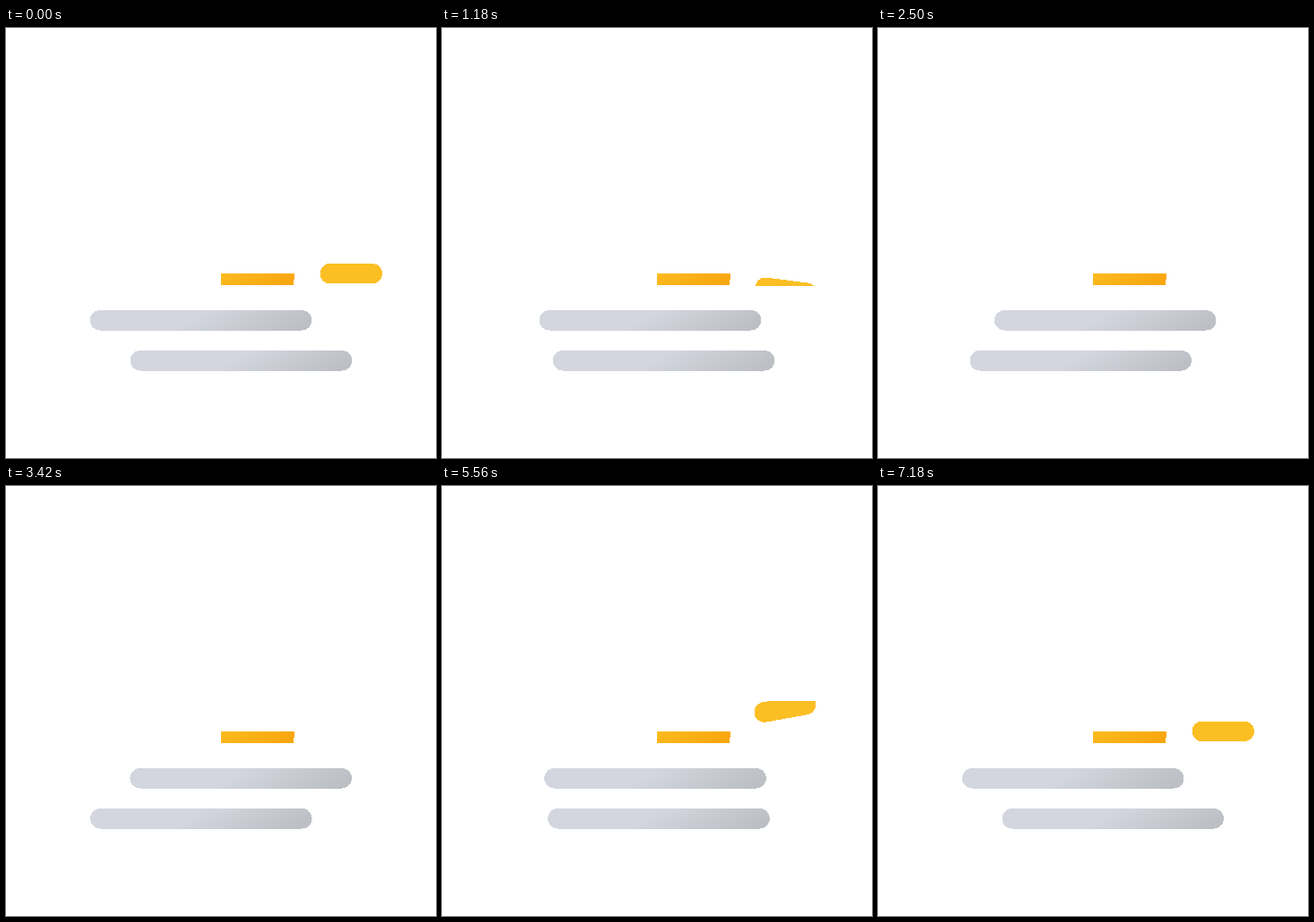
An HTML page that plays this animation: 480x480 px, repeating every 7.22 s.

```html
<!DOCTYPE html>
<html lang="en">
<head>
<meta charset="utf-8">
<title>Sun and fog</title>
<style>
  html, body { margin: 0; width: 100%; height: 100%; overflow: hidden; background: #fff; }
  svg { display: block; width: 100vw; height: 100vh; }
</style>
</head>
<body>
<svg viewBox="0 0 480 480" shape-rendering="crispEdges">
  <defs>
    <linearGradient id="fog" gradientUnits="userSpaceOnUse" x1="-31" y1="-54" x2="31" y2="54">
      <stop offset=".45" stop-color="#d3d6de"/>
      <stop offset="1" stop-color="#bcbfc4"/>
    </linearGradient>
    <linearGradient id="sun" gradientUnits="userSpaceOnUse" x1="240" y1="274" x2="262" y2="312">
      <stop offset="0" stop-color="#fcbb1e"/>
      <stop offset="1" stop-color="#f9a711"/>
    </linearGradient>
    <clipPath id="sky"><rect x="240" y="240" width="240" height="48"/></clipPath>
  </defs>
  <path d="M240 274H321.8A81.8 81.8 0 0 1 320.8 287H240Z" fill="url(#sun)"/>
  <g clip-path="url(#sky)">
    <rect id="ray" x="350.6" y="262.9" width="69.4" height="22.5" rx="11.25" fill="#fbbf24"/>
  </g>
  <rect id="upper" x="-123.75" y="-11.25" width="247.5" height="22.5" rx="11.25" fill="url(#fog)"/>
  <rect id="lower" x="-123.75" y="-11.25" width="247.5" height="22.5" rx="11.25" fill="url(#fog)"/>
</svg>
<script>
  const LOOP = 7220, STEP = 20, CYCLE = 7200, LAST = 7180;
  const LEFT = 217.5, TRAVEL = 45;
  const [ray, upper, lower] = ['ray', 'upper', 'lower'].map(id => document.getElementById(id));

  const bezier = (a, b, s) => 3 * (1 - s) ** 2 * s * a + 3 * (1 - s) * s * s * b + s ** 3;

  function easeOut(x) {
    let lo = 0, hi = 1;
    for (let i = 0; i < 24; i++) {
      const mid = (lo + hi) / 2;
      if (bezier(0.2, 0.667, mid) < x) lo = mid; else hi = mid;
    }
    return bezier(0, 1, (lo + hi) / 2);
  }

  const place = (el, x, y) => el.setAttribute('transform', `translate(${x} ${y})`);

  function draw(ms) {
    const t = Math.min(Math.floor(ms / STEP) * STEP, LAST) / CYCLE;
    // Rays are 45° apart: past the midpoint the next one rises into view.
    const angle = 45 * (t < 0.5 ? t : t - 1);
    const drift = TRAVEL * (t < 0.5 ? easeOut(t * 2) : 2 - t * 2);
    ray.setAttribute('transform', `rotate(${angle} 240 274.15)`);
    place(upper, LEFT + drift, 326.25);
    place(lower, LEFT + TRAVEL - drift, 371.25);
  }

  const start = performance.now();
  function tick() {
    draw((performance.now() - start) % LOOP);
    requestAnimationFrame(tick);
  }
  tick();
</script>
</body>
</html>
```
